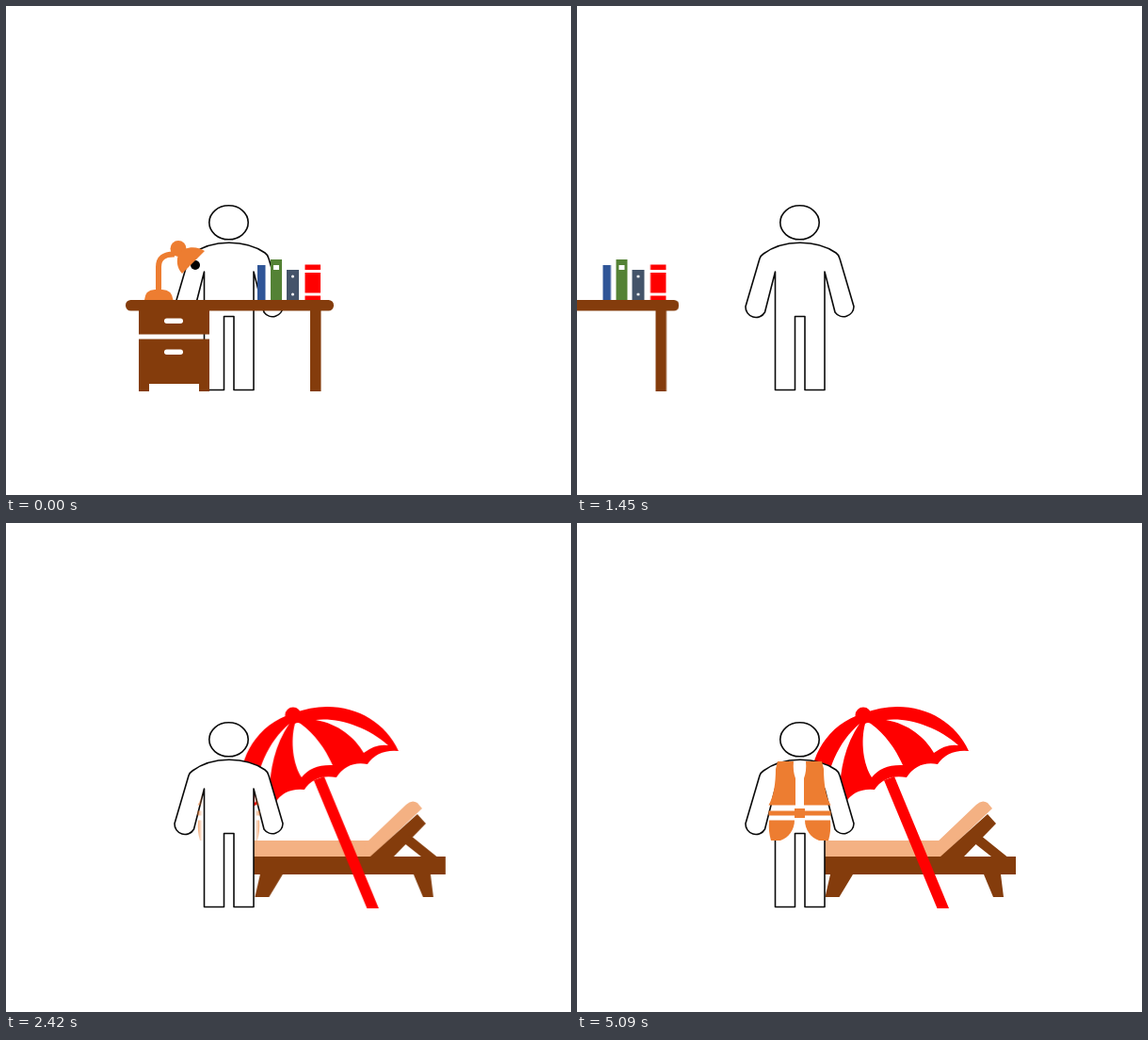
An HTML page without scripts for the animation above (5180 ms loop, 600x519 px).

```html
<!DOCTYPE html>
<html lang="en">
<head>
<meta charset="utf-8">
<title>From desk to deck chair</title>
<style>
  html, body { margin: 0; width: 100%; height: 100%; overflow: hidden; background: #fff; }
  svg { display: block; width: 100%; height: 100%; }

  .wood { fill: #843c0c; }
  .orange { fill: #ed7d31; }
  .red { fill: #f00; }
  .white { fill: #fff; }
  .cushion { fill: #f4b183; }
  .person { fill: #fff; stroke: #0a0a0a; stroke-width: 1.6; stroke-linejoin: round; }

  .desk, .beach, .wipe { animation: 5180ms linear infinite; }
  .desk { animation-name: leave; }
  .beach { animation-name: arrive; }
  .wipe { animation-name: reveal; }

  @keyframes leave {
    0%, 18.02% { transform: translateX(0); }
    32.62%, 100% { transform: translateX(-350px); }
  }
  @keyframes arrive {
    0%, 36.1% { transform: translateX(358px); }
    46.76%, 100% { transform: translateX(0); }
  }
  @keyframes reveal {
    0%, 45.37% { transform: translateX(0); }
    55.02%, 100% { transform: translateX(42px); }
  }
</style>
</head>
<body>
<svg viewBox="0 0 600 519">
  <defs>
    <linearGradient id="soft" gradientUnits="userSpaceOnUse" x1="195" x2="203" y1="0" y2="0">
      <stop offset="0" stop-color="#fff"/>
      <stop offset="1" stop-color="#fff" stop-opacity="0"/>
    </linearGradient>
    <!-- vest opens from both sides towards the middle -->
    <mask id="split" maskUnits="userSpaceOnUse" x="190" y="240" width="93" height="110">
      <rect class="wipe" x="145" y="240" width="58" height="110" fill="url(#soft)"/>
      <g transform="translate(473 0) scale(-1 1)">
        <rect class="wipe" x="145" y="240" width="58" height="110" fill="url(#soft)"/>
      </g>
    </mask>
    <g id="half">
      <path d="M213 253H230Q229 263 232 271V299.500H203.500C209 290 211 276 211 261Z"/>
      <path d="M203.500 305.500H232V310.500H203.500Z"/>
      <path d="M204 315.500H231C231 325 225 334 216 337H206Q203 327 204 315.500Z"/>
    </g>
  </defs>

  <g class="beach">
    <g class="cushion">
      <path d="M251 354V347Q251 337 261 337H384V354Z"/>
      <path d="M381 340L424 299Q430 293 436 297L441 303L387 354H380Z"/>
    </g>
    <g class="wood">
      <path d="M244 354H466V373H244Z"/>
      <path d="M436 309L445 319L411 354H386Z"/>
      <path d="M428 331L459 356H442.500L421 339Z"/>
      <path d="M269 373H293L278.500 397H263.500Z"/>
      <path d="M432 373H450L453 397H442Z"/>
    </g>
    <g class="red">
      <path d="M326 273L337 269L395 409H382.500Z"/>
      <circle cx="304" cy="204" r="8.500"/>
      <path d="M253 311C238 274 252 218 304 202C350 184 398 202 416 242Q394 240 383 256Q362 252 350 270Q327 266 316 283Q295 281 285 297Q263 293 253 311Z"/>
    </g>
    <g class="white">
      <path d="M300 213C278 232 264 262 263 297Q270 289 279 288C279 262 285 235 300 213Z"/>
      <path d="M306 213C301 232 304 256 313 270Q324 256 346 257C338 239 327 224 312 213Q309 211 306 213Z"/>
      <path d="M328 209C351 206 383 216 405 236Q392 234 379 244C370 228 352 213 328 209Z"/>
    </g>
  </g>

  <g class="person">
    <ellipse cx="236.500" cy="229.800" rx="20.700" ry="18"/>
    <path d="M194 268Q195 265 198 263C219 247.500 254 247.500 275 262Q278 264 279 268L294 319A11 11 0 0 1 274 325L263 282V407.500H242V329.500H231.500V407.500H210.500V282L199.500 325A11 11 0 0 1 179 319Z"/>
  </g>

  <g mask="url(#split)">
    <path class="white" d="M209 298H265V317H209Z"/>
    <g class="orange">
      <use href="#half"/>
      <use href="#half" transform="translate(473 0) scale(-1 1)"/>
      <rect x="231" y="303" width="11" height="10"/>
    </g>
  </g>

  <g class="desk">
    <circle cx="201" cy="275" r="5"/>
    <g class="orange">
      <path d="M147 312Q148 301 158 301H166Q176 301 177.500 312Z"/>
      <path d="M162 303V277Q162 263 179 263.500" fill="none" stroke="#ed7d31" stroke-width="6"/>
      <circle cx="183" cy="257.500" r="8.500"/>
      <path d="M211 260L187 284C181 278 181 269 183 264C190 254 203 255 211 260Z"/>
    </g>

    <path fill="#2f5597" d="M267 275H275.500V312H267Z"/>
    <path fill="#548235" d="M281 269H293V312H281Z"/>
    <path fill="#44546a" d="M298 280H311V312H298Z"/>
    <path class="red" d="M317.500 274.500H334V280H317.500ZM317.500 283H334V304.500H317.500ZM317.500 307.500H334V312H317.500Z"/>
    <g class="white">
      <rect x="284" y="275" width="6" height="5"/>
      <circle cx="304.500" cy="287" r="1.500"/>
      <circle cx="304.500" cy="306" r="1.500"/>
    </g>

    <g class="wood">
      <rect x="127" y="312" width="221" height="11.500" rx="5.500"/>
      <path d="M141 323H216V348.500H141Z"/>
      <path d="M141 353.500H216V409H205V401H152V409H141Z"/>
      <path d="M323 323H334.500V409H323Z"/>
    </g>
    <g class="white">
      <rect x="168" y="331.500" width="20" height="5.500" rx="2.700"/>
      <rect x="168" y="364.500" width="20" height="5.500" rx="2.700"/>
    </g>
  </g>
</svg>
</body>
</html>
```
